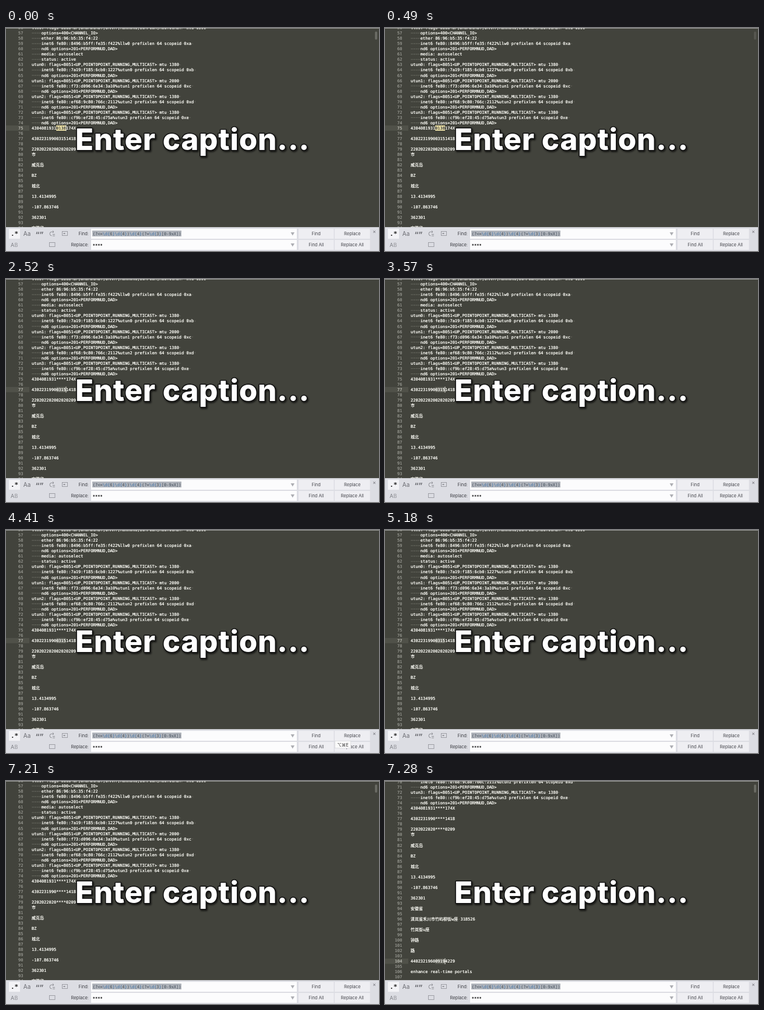
An HTML page with a canvas for the animation above (7.35 s loop, 640 by 382 pixels).

```html
<!DOCTYPE html>
<html lang="en">
<head>
<meta charset="utf-8">
<title>Find and replace</title>
<style>
html, body { margin: 0; width: 100%; height: 100%; overflow: hidden; background: #42433c; }
canvas { display: block; width: 640px; height: 382px; }
</style>
</head>
<body>
<canvas id="stage" width="640" height="382"></canvas>
<script>
const ctx = document.getElementById('stage').getContext('2d');
const LOOP = 7350, STEP = 70;
const CODE = '7px "DejaVu Sans Mono", "Noto Sans CJK SC", "Noto Sans CJK", monospace';
const UI = '7.5px Inter, Roboto, sans-serif';
const LEFT = 44, CHAR = 4.214, ROW = 9.03;
const REPLACED = [2380, 5740, 7210], SCROLLED = 7280;

const flags = (n, mtu) =>
  `utun${n}: flags=8051<UP,POINTOPOINT,RUNNING,MULTICAST> mtu ${mtu} `;
const inet = (addr, dev, scope) =>
  `\tinet6 fe80::${addr}%${dev} prefixlen 64 scopeid ${scope} `;
const ND6 = '\tnd6 options=201<PERFORMNUD,DAD>';

const lines = {
  56: 'llw0: flags=8863<UP,BROADCAST,SMART,RUNNING,SIMPLEX,MULTICAST> mtu 1500 ',
  57: '\toptions=400<CHANNEL_IO>',
  58: '\tether 86:96:b5:35:f4:22 ',
  59: inet('8496:b5ff:fe35:f422', 'llw0', '0xa'),
  60: ND6,
  61: '\tmedia: autoselect',
  62: '\tstatus: active',
  63: flags(0, 1380), 64: inet('7a19:f185:6cb0:1227', 'utun0', '0xb'), 65: ND6,
  66: flags(1, 2000), 67: inet('f73:d096:6e34:3a10', 'utun1', '0xc'), 68: ND6,
  69: flags(2, 1380), 70: inet('ef68:9c80:766c:2112', 'utun2', '0xd'), 71: ND6,
  72: flags(3, 1380), 73: inet('cf9b:ef28:45:d75a', 'utun3', '0xe'), 74: ND6,
  80: '市', 82: '威克岛', 84: 'BZ', 86: '城北',
  88: '13.4134995', 90: '-107.863746', 92: '362301', 94: '安徽省',
  96: '清岚省禾川市竹屿柳街w座 318526', 98: '竹岚街u座',
  100: '钟路', 102: '路', 104: '440232196009194229',
  106: 'enhance real-time portals'
};
const ids = ['43040819310138174X', '430223199003151418', '220202202002020209'];

// Moments at which the caret turns off, on, off, ...
const blinks = [420, 960, 1540, 2100, 2940, 3430, 4060, 4620, 5110, 5740, 6240, 6960];

function box(x, y, w, h, color) {
  ctx.fillStyle = color;
  ctx.fillRect(x, y, w, h);
}

function label(text, x, y, color, font = UI, align = 'left') {
  ctx.font = font;
  ctx.textAlign = align;
  ctx.fillStyle = color;
  ctx.fillText(text, x, y);
}

// Small code is painted twice for firmer strokes.
function code(text, x, y, color, align) {
  label(text, x, y, color, CODE, align);
  label(text, x, y, color, CODE, align);
}

function codeLine(text, y) {
  let x = LEFT;
  if (text[0] === '\t') {
    for (let i = 0; i < 4; i++) box(x + i * CHAR + 0.3, y - 2.8, CHAR - 0.6, 0.7, '#77786f');
    x += 4 * CHAR;
    text = text.slice(1);
  }
  code(text, x, y, '#f8f8f2');
  ctx.fillStyle = '#85867d';
  let at = x;
  for (const ch of text) {
    if (ch === ' ') ctx.fillRect(at + 1.6, y - 2.9, 1, 1);
    at += ctx.measureText(ch).width;
  }
}

function editor(t) {
  const done = REPLACED.filter(m => t >= m).length;
  const scroll = t >= SCROLLED ? 124.5 : 0;
  const base = n => 173.8 + (n - 75) * ROW - scroll;
  const current = done < 3 ? 75 + done * 2 : 104;
  const top = base(current) - 6.9;
  const selX = LEFT + 10 * CHAR, selW = 4 * CHAR;

  box(0, 0, 640, 382, '#42433c');
  box(0, top, 40, 9, '#505149');
  box(selX, top, selW, 9, done ? '#5e5f57' : '#f3e6a8');

  for (let n = 56; n <= 107; n++) {
    const y = base(n);
    if (y < -2 || y > 350) continue;
    code(n, 29.5, y, n === current ? '#b5b6ad' : '#90918a', 'right');
    const k = (n - 75) / 2;
    const id = ids[k];
    const text = id ? (done > k ? id.slice(0, 10) + '****' + id.slice(14) : id) : lines[n];
    if (text) codeLine(text, y);
  }
  if (!done) code(ids[0].slice(10, 14), selX, base(75), '#3c3b30');

  const caretOn = blinks.filter(m => t >= m).length % 2 === 0;
  if (caretOn) box(Math.round(selX + selW) - 0.5, top - 0.5, 1, 10, '#f8f8f0');

  const fade = t >= 7140 ? 1 : Math.max(0, Math.min(1, (630 - t) / 280));
  if (fade) {
    ctx.globalAlpha = fade;
    ctx.beginPath();
    ctx.roundRect(633, 6, 4, 14, 2);
    ctx.fillStyle = '#696a63';
    ctx.fill();
    ctx.globalAlpha = 1;
  }
  box(0, 0, 640, 1, '#9c9d99');
}

function frame(x, y, w, h, color) {
  ctx.strokeStyle = color;
  ctx.lineWidth = 0.9;
  ctx.strokeRect(x, y, w, h);
}

function icons() {
  box(5, 344, 19, 17, '#f3f3f6');
  label('.*', 14.5, 356, '#222', 'bold 11px "DejaVu Sans Mono", monospace', 'center');
  label('Aa', 36, 356, '#6b6c72', '10px Inter, sans-serif', 'center');
  label('“”', 57.5, 359, '#6b6c72', 'bold 13px Inter, sans-serif', 'center');

  ctx.strokeStyle = '#85868c';
  ctx.lineWidth = 0.9;
  ctx.beginPath();
  ctx.arc(78.5, 352.5, 3.4, Math.PI * 0.5, Math.PI * 1.5);
  ctx.lineTo(82, 349.1);
  ctx.moveTo(80, 347.2);
  ctx.lineTo(82, 349.1);
  ctx.lineTo(80, 351);
  ctx.moveTo(80, 353.5);
  ctx.lineTo(84, 353.5);
  ctx.moveTo(80, 356);
  ctx.lineTo(84, 356);
  ctx.stroke();

  frame(96.5, 348.5, 9, 7, '#96979d');
  box(98.5, 351, 3, 2, '#96979d');
  label('A', 11, 375, '#7b7c82', '9px Inter, sans-serif', 'center');
  label('B', 17.5, 375, '#909197', '9px Inter, sans-serif', 'center');
  frame(74.5, 367.5, 9.5, 7, '#96979d');
}

function panel(t) {
  box(0, 341, 640, 41, '#dcdde3');
  box(0, 341, 640, 1, '#cbccd0');
  icons();

  const rows = [['Find:', 'Find', 'Replace'], ['Replace:', 'Find All', 'Replace All']];
  rows.forEach(([name, left, right], i) => {
    const y = 344 + i * 19;
    label(name, 142, y + 11, '#3c3d43', UI, 'right');
    box(146, y, 353, 17, '#fcfcfd');
    ctx.beginPath();
    ctx.moveTo(488.5, y + 6);
    ctx.lineTo(495, y + 6);
    ctx.lineTo(491.75, y + 11.5);
    ctx.fillStyle = '#adaeb3';
    ctx.fill();
    [left, right].forEach((text, j) => {
      const x = 502 + j * 62;
      box(x, y, 60.5, 17, '#eeeef2');
      label(text, x + 30.25, y + 11, '#46474d', UI, 'center');
    });
  });

  const regex = '(?<=\\d{6}\\d{4})\\d{4}(?=\\d{3}[0-9xX])';
  box(148, 347, 153, 10, '#b0b4bb');
  [...regex].forEach((ch, i) => {
    const color = /[\\d{}]/.test(ch) ? '#5f84ab' : '#626b76';
    code(ch, 148.8 + i * CHAR, 354.5, color);
  });
  code('****', 148.8, 374.5, '#111');
  label('×', 632, 351.5, '#77787e', '9px Inter, sans-serif', 'center');

  if (t >= 4340 && t < 5040) {
    box(564, 361, 28, 13, '#c6c7cb');
    box(564.5, 361.5, 27, 12, '#fafafa');
    label('⌥⌘E', 578, 370.5, '#333', '7.5px Inter, "DejaVu Sans", sans-serif', 'center');
  }
}

function caption() {
  const text = 'Enter caption...';
  ctx.save();
  ctx.font = '800 51px Inter, "Open Sans", sans-serif';
  ctx.letterSpacing = '0.7px';
  ctx.textAlign = 'center';
  ctx.lineJoin = 'round';
  ctx.lineWidth = 3;
  ctx.strokeStyle = '#111';
  ctx.shadowColor = 'rgba(0,0,0,.8)';
  ctx.shadowBlur = 3;
  ctx.shadowOffsetX = ctx.shadowOffsetY = 1.5;
  ctx.strokeText(text, 320, 209);
  ctx.shadowColor = 'transparent';
  ctx.fillStyle = '#fff';
  ctx.fillText(text, 320, 209);
  ctx.restore();
}

const start = performance.now();
function draw() {
  const t = Math.floor(((performance.now() - start) % LOOP) / STEP) * STEP;
  editor(t);
  panel(t);
  caption();
  requestAnimationFrame(draw);
}
draw();
</script>
</body>
</html>
```
